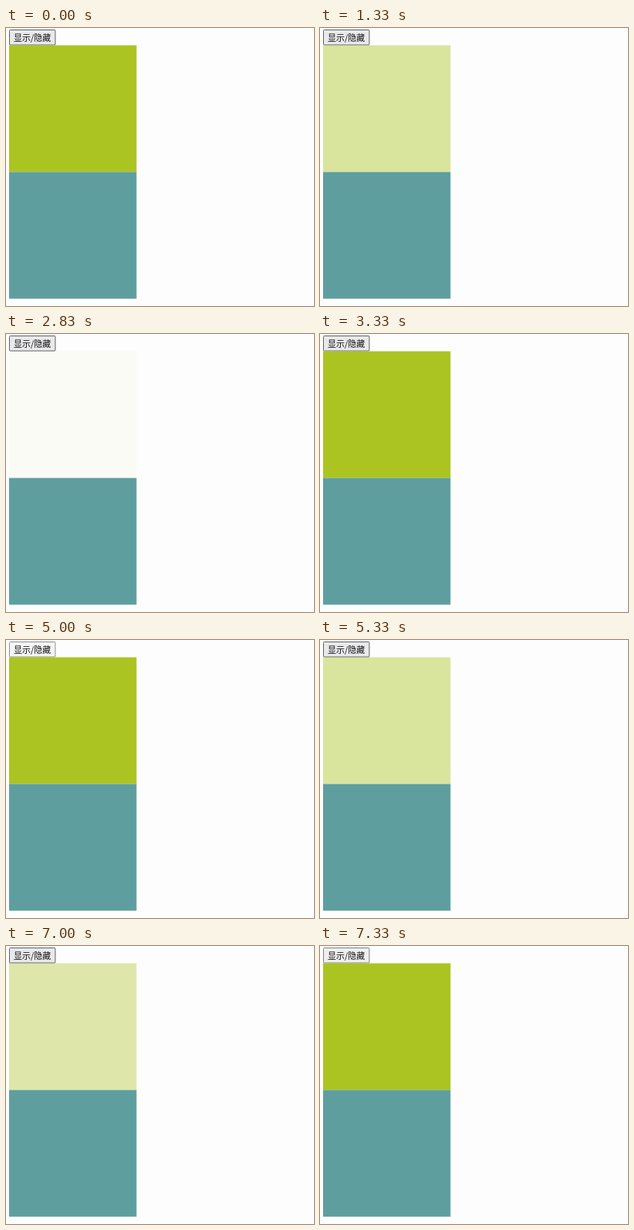
An HTML page for the animation above (8.17 s loop, 400 px wide and 362 px high).

```html
<!DOCTYPE html>
<html lang="zh-CN">
<head>
<meta charset="utf-8">
<style>
  html, body { margin: 0; width: 100%; height: 100%; overflow: hidden; background: #fdfdfd; }
  svg { display: block; }
  text { font: 11px "Noto Sans CJK SC", "Noto Sans CJK", sans-serif; fill: #111; }
</style>
</head>
<body>
<svg width="400" height="362" viewBox="0 0 400 362">
  <rect width="400" height="362" fill="#fdfdfd"/>
  <rect id="button" x="4.5" y="2.5" width="59.5" height="19.5" rx="1"/>
  <text x="10" y="17">显示/隐藏</text>
  <rect id="green" x="4" y="22.5" width="165.5" height="165" fill="#acc422"/>
  <rect id="teal" x="4" y="187.5" width="165.5" height="165" fill="#5f9e9f"/>
</svg>
<script>
const LOOP = 8170;
const [button, green, teal] = ['button', 'green', 'teal'].map(id => document.getElementById(id));

const idle = ['#efefef', '#7e7e7e'];
const hover = ['#e9e9ec', '#606060'];
const active = ['#f5f5f5', '#8d8d8d'];

const BUTTON_STATES = [
  [0, hover], [1000, active], [1170, hover], [2670, active], [2830, hover],
  [5000, active], [5170, hover], [6670, active], [6830, hover], [7170, idle]
];

// Opacity of the green box; null means it is removed and the layout closes up.
const fadeOut = start => [[start, .78], [start + 160, .44], [start + 330, .11], [start + 500, null]];
const fadeIn = start => [[start, .04], [start + 170, .385], [start + 340, .72], [start + 500, 1]];
const OPACITY = [
  [0, 1], ...fadeOut(1170), ...fadeIn(2830), ...fadeOut(5170), ...fadeIn(6830)
];

const valueAt = (steps, time) => steps.findLast(([start]) => start <= time)[1];

function draw(time) {
  const [fill, stroke] = valueAt(BUTTON_STATES, time);
  button.setAttribute('fill', fill);
  button.setAttribute('stroke', stroke);

  const opacity = valueAt(OPACITY, time);
  green.setAttribute('opacity', opacity ?? 0);
  teal.setAttribute('y', opacity === null ? 22.5 : 187.5);
}

const origin = performance.now();
function tick() {
  draw((performance.now() - origin) % LOOP);
  requestAnimationFrame(tick);
}
tick();
</script>
</body>
</html>
```
